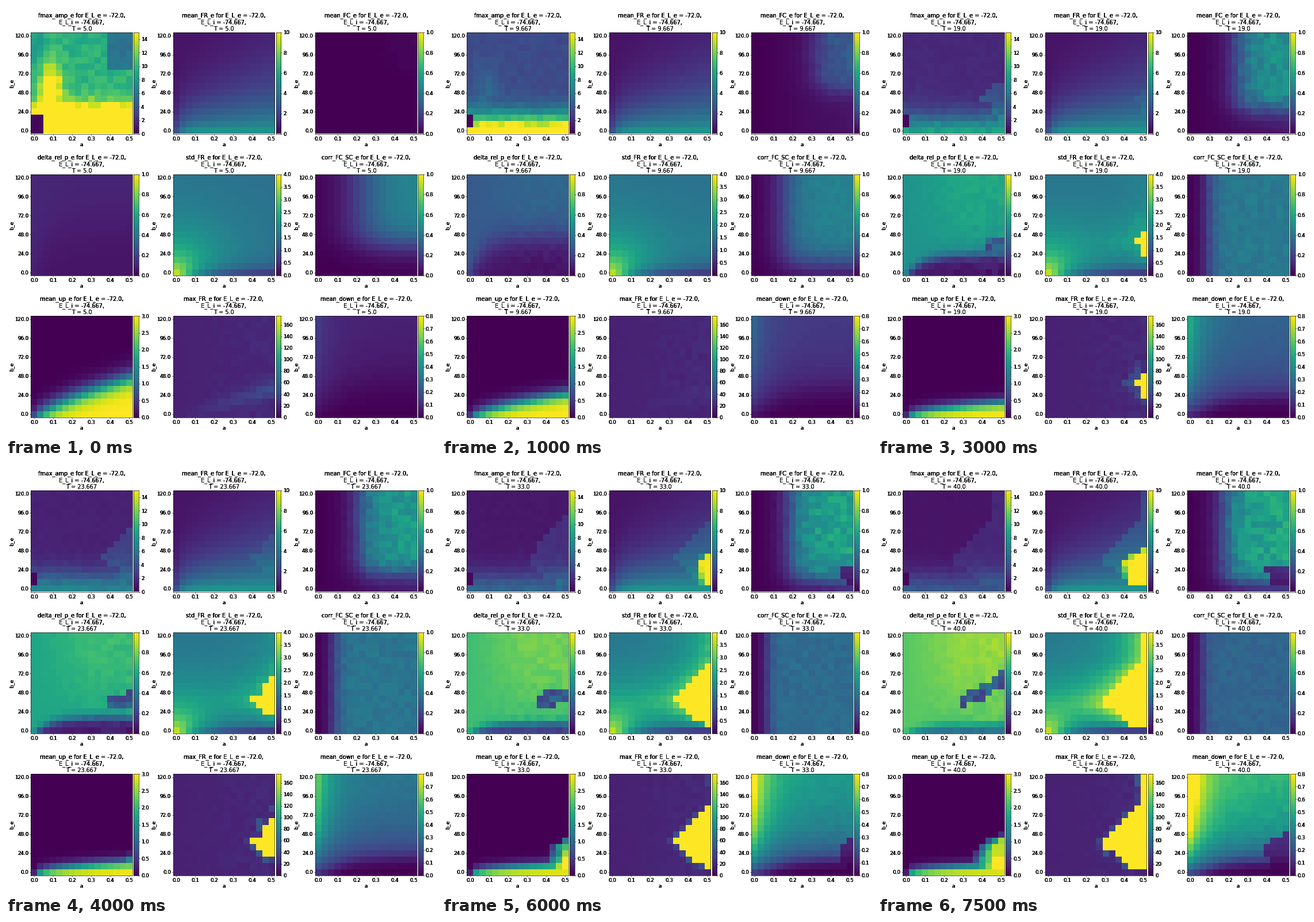
These frames come from a looping animation (748 px wide and 748 px high, 8000 ms). A matplotlib script:

```python
import numpy as np
import matplotlib.pyplot as plt
from matplotlib.animation import FuncAnimation

SIZE, DPI, N, STEPS = 748, 100, 16, 16
PT = 72 / DPI
LEFT, TOP, SIDE, PITCH_X, PITCH_Y = 43.4, 46.2, 176.3, 247.4, 246.6
CELL = SIDE / N
TITLE, LABEL = 9.75 * PT, 8.8 * PT

# name, colour maximum, colour bar step, decimals
PANELS = [("fmax_amp_e", 15, 2, 0), ("mean_FR_e", 10, 2, 0), ("mean_FC_e", 1, .2, 1),
          ("delta_rel_p_e", 1, .2, 1), ("std_FR_e", 4, .5, 1), ("corr_FC_SC_e", 1, .2, 1),
          ("mean_up_e", 3, .5, 1), ("max_FR_e", 175, 20, 0), ("mean_down_e", .8, .1, 1)]

Y, X = np.mgrid[0:N, 0:N].astype(float)


def step(u):
    return 1 / (1 + np.exp(-np.clip(u, -40, 40)))


def fade(k, start, end, rate):
    """Exponential approach from start to end."""
    return end + (start - end) * np.exp(-k / rate)


def burst_depth(k, noise):
    """Distance of each cell inside the region of runaway activity."""
    tip = 8.5 + .45 * (15 - k) + fade(k, 6, 0, 2)
    centre = 4.3 + .04 * (15 - k)
    edge = tip + np.maximum(1.25 * (centre - Y), np.minimum(.9 * (Y - centre - .2), 6.4))
    return np.where(Y > 0, X - edge + .08 * (15 - k) * noise, -9)


def peak_frequency(k, T, n, deep):
    early = max(0, 1 - k / 2)
    f = 33 + 127 * np.exp(-(Y / 2.6) ** 1.6) + 35 * (deep > -1)
    f += 26 * np.exp(-((X - 2.5) / 2) ** 2 - ((Y - 7) / 3.5) ** 2) * fade(k, 1, 0, 3)
    f *= (1 + .45 * early) * (1 + .08 * n) / T
    f *= 1 - .4 * early * ((X > 11) & (Y > 9)) - .12 * early * (X < 2)
    silent = (X <= early) & (Y < 3) & (Y >= 1 - early)
    return np.where(silent, .3, f)


def mean_rate(k, deep, core):
    f = .5 + 4.6 * np.exp(-Y / (3 + .25 * X)) * (1 - .55 * np.exp(-X / 1.2))
    return f + .5 * k * np.clip(core + .4, 0, 1) + .07 * k * (deep >= 0)


def mean_fc(k, n, core):
    rise = step((X - fade(k, 11.5, 5, 6)) / 1.1) * step((Y - fade(k, 9.3, .8, 5)) / .9)
    f = .004 * X * fade(k, 0, 1, 1) + fade(k, .02, .53, 3.5) * rise * (1 + .14 * n)
    return f * np.where((core > 0) & (Y < 4), .25, 1)


def delta_power(k, n):
    grown = fade(k, 0, 1, 3)
    low = .05 + .3 * (k / 15) ** 4
    edge = -.7 + (fade(k, 8, .3, 5) + .9) * (1 - np.exp(-X / 2.5))
    high = fade(k, .11, .84, 7.5) + .1 * grown * np.clip(X / 9, 0, 1) * step((Y - 6) / 2)
    f = low + (high - low) * step((Y - edge) / fade(k, 3, .35, 2))
    f += .04 * n * X / 15 * grown
    # weak band that grows leftwards and tilts upwards
    start, slope = 9 + .4 * (15 - k), .6 * (k / 15) ** 3
    band = (np.abs(Y - 4.4 - slope * (X - start)) + .3 * n < 1.1) & (X >= start)
    return np.where(band, np.minimum(f, .28 + .1 * n), f)


def std_rate(k, n, deep):
    f = 1.45 + 2.15 * np.exp(-np.sqrt(.8 * X ** 2 + Y ** 2) / 5)
    f -= .85 * np.exp(-Y / 1.3) * (1 - np.exp(-(X / 3) ** 2))
    f += .125 * k * np.exp(np.minimum(deep, 0) / 4.5) * (1 - np.exp(-Y)) * (1 + .05 * n)
    return np.where(deep >= 0, 4, f)


def fc_sc_correlation(k, n):
    rise = step((X - fade(k, 6.8, 1.8, 4)) / fade(k, 2.2, .6, 3))
    return (.46 - .009 * k) * rise * step((Y - 4.5 + 1.5 * k) / 1.3) * (1 + .02 * min(k, 4) * n)


def mean_up(T, k, n, deep):
    height = -1 + (1.5 + 26 / T) * (X / 15) ** fade(k, .7, .2, 6)
    f = 3 * step((height - Y) / (.35 + 2.5 / T))
    active = deep - 1.4 * np.maximum(Y - 2, 0) + .8 + .3 * n
    return f + .9 * np.clip(active, 0, 3) * (Y > 0)


def max_rate(k, n, deep):
    ridge = np.exp(-((Y - .3 * X + .5) / 1.2) ** 2)
    f = 16 + (.3 + .2 * n + fade(k, 1.4, 0, 1) * ridge) * X
    f = np.where(deep > -1.3, 34 + 14 * n, f)
    return np.where(deep >= 0, 175, f)


def mean_down(k, n, core):
    left = np.exp(-X / 3)
    edge = fade(k, 4.5, 1.5, 6) * (1 - left) - 3 * left
    f = (.15 + .061 * k) * (1 - np.exp(-(Y + 1.2) / 6)) * (.52 + .48 * np.exp(-X / 2.5))
    f *= step((Y - edge) / fade(k, 2, .6, 3)) * (1 + .004 * k * n * X / 15)
    return f * np.where(core > 0, .3, 1)


def fields(k, T):
    n = np.random.default_rng(40 + k).uniform(-1, 1, (9, N, N))
    deep = burst_depth(k, n[7])
    core = deep - np.maximum(Y - 1.2, 0)
    return [peak_frequency(k, T, n[0], deep), mean_rate(k, deep, core), mean_fc(k, n[2], core),
            delta_power(k, n[3]), std_rate(k, n[4], deep), fc_sc_correlation(k, n[5]),
            mean_up(T, k, n[6], deep), max_rate(k, n[1], deep), mean_down(k, n[8], core)]


plt.rcParams["font.family"] = "DejaVu Sans"
fig = plt.figure(figsize=(SIZE / DPI, SIZE / DPI), dpi=DPI, facecolor="white")


def write(x, y, text, size=LABEL, ha="center", va="baseline", copies=4, **kw):
    """Stacked copies give the text its heavier edge."""
    return [fig.text(x / SIZE, 1 - y / SIZE, text, fontsize=size, ha=ha, va=va, **kw)
            for _ in range(copies)]


def box(x, y, w, h):
    ax = fig.add_axes([x / SIZE, 1 - (y + h) / SIZE, w / SIZE, h / SIZE])
    ax.tick_params(length=2.4 * PT, width=.6 * PT, labelbottom=False, labelleft=False)
    for spine in ax.spines.values():
        spine.set_linewidth(.6 * PT)
    return ax


def build(index, name, vmax, tick, digits):
    row, col = divmod(index, 3)
    x0, y0 = LEFT + col * PITCH_X, TOP + row * PITCH_Y
    mid, bottom = x0 + SIDE / 2, y0 + SIDE
    ax = box(x0, y0, SIDE, SIDE)
    image = ax.imshow(np.zeros((N, N)), origin="lower", aspect="auto", cmap="viridis",
                      vmin=0, vmax=vmax, interpolation="nearest")
    ax.set_xticks(range(0, N, 3))
    ax.set_yticks(range(0, N, 3))
    for i in range(0, N, 3):
        offset = (i + .5) * CELL
        write(x0 + offset, bottom + 11.3, f"{i / 30:.1f}")
        write(x0 - 3.8, bottom - offset + 3.2, f"{i * 8:.1f}", ha="right")
    write(mid, bottom + 21, "a")
    write(x0 - 33.8, y0 + SIDE / 2, "b_e", va="center", rotation=90)

    bar = box(x0 + SIDE + 2.5, y0, 8.8, SIDE)
    bar.imshow(np.linspace(0, 1, 256)[:, None], origin="lower", aspect="auto",
               cmap="viridis", extent=(0, 1, 0, vmax))
    ticks = np.arange(0, vmax + 1e-6, tick)
    bar.set_xticks([])
    bar.set_yticks(ticks)
    bar.yaxis.tick_right()
    bar.tick_params(labelright=False)
    for value in ticks:
        write(x0 + SIDE + 15.2, bottom - value / vmax * SIDE + 3.2,
              f"{value:.{digits}f}", ha="left")

    write(mid, y0 - 27, f"{name} for E_L_e = -72.0,", TITLE)
    write(mid, y0 - 15.1, "E_L_i = -74.667,", TITLE)
    return image, write(mid, y0 - 3.2, "", TITLE, copies=2)


panels = [build(i, *spec) for i, spec in enumerate(PANELS)]


def update(k):
    T = 5 + 35 * k / (STEPS - 1)
    for (image, labels), data in zip(panels, fields(k, T)):
        image.set_data(data)
        for label in labels:
            label.set_text(f"T = {round(T, 3)}")
    return [image for image, _ in panels]


anim = FuncAnimation(fig, update, frames=STEPS, interval=500, repeat=True,
                     repeat_delay=0, blit=False)
plt.show()
```
